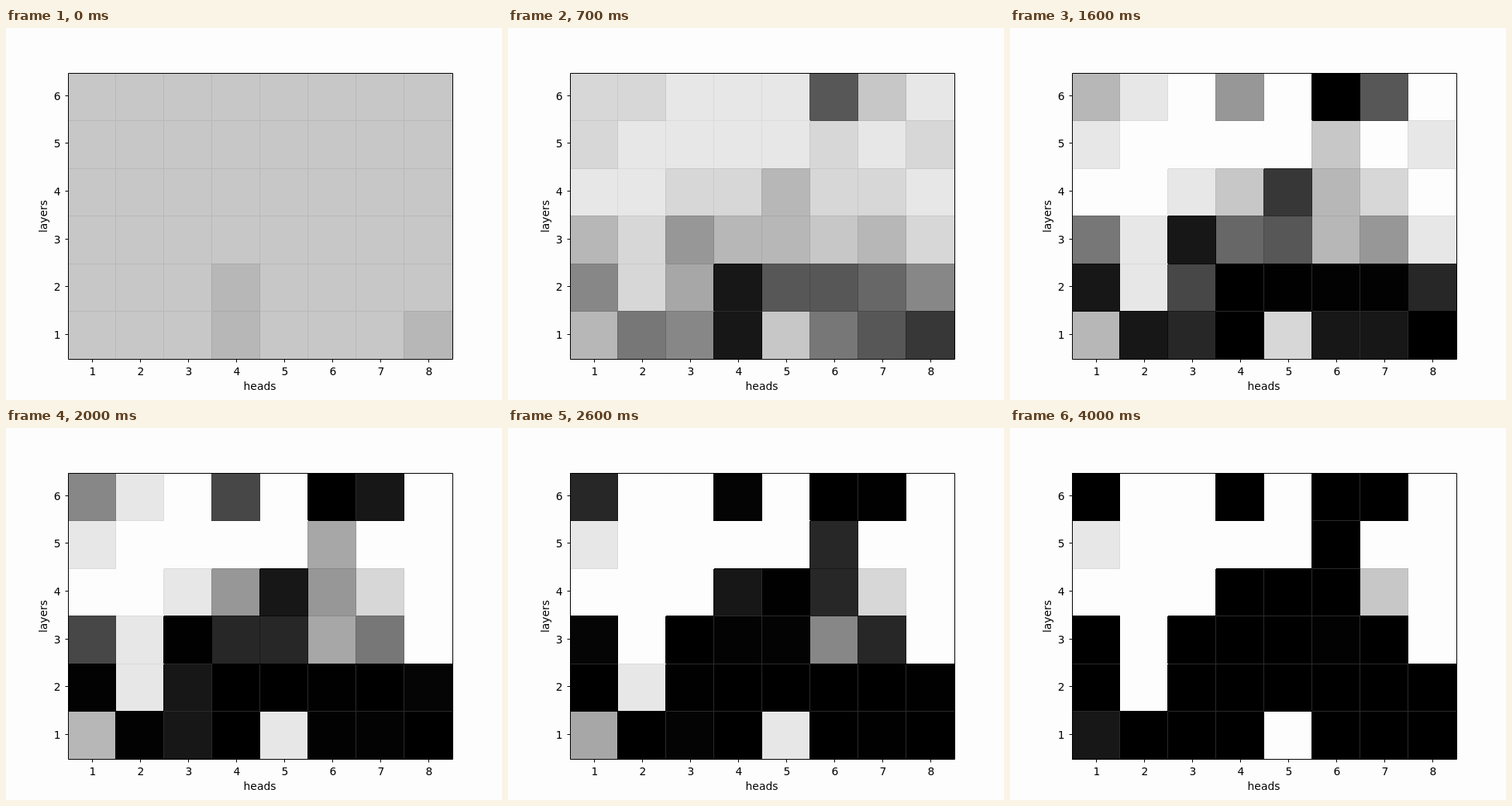
An HTML page with a canvas for the animation above (4100 ms loop, 640x480 px).

```html
<!DOCTYPE html>
<html lang="en">
<head>
<meta charset="utf-8">
<title>Heads and layers</title>
<style>
  html, body { margin: 0; width: 100%; height: 100%; overflow: hidden; background: #fdfdfd; }
  canvas, svg { position: absolute; left: 0; top: 0; width: 640px; height: 480px; }
  text { font: 13.89px "DejaVu Sans", sans-serif; fill: #000; }
  path { fill: none; stroke: #000; }
</style>
</head>
<body>
<canvas id="map" width="640" height="480"></canvas>
<svg id="axes" viewBox="0 0 640 480">
  <path d="M80.5 58.5H576.5V427.5H80.5Z"/>
  <text x="327.5" y="467" text-anchor="middle">heads</text>
  <text transform="translate(52.5 243) rotate(-90)" text-anchor="middle">layers</text>
</svg>
<script>
const STEP = 100, STEPS = 41, COLS = 8, ROWS = 6;
const xs = Array.from({ length: COLS + 1 }, (_, i) => 80 + 62 * i);
const ys = Array.from({ length: ROWS + 1 }, (_, i) => Math.round(58.4 + 61.6 * i));

// Logit (in tenths) of each head's brightness after 1, 2 and 3 seconds;
// missing entries continue in a straight line.
const up = [33], soon = [23, 33];
const heads = [
  [[18, 1, -37], [20, 25, 35], up, [18, -9, -52], up, [-22, -95], [8, -22, -65], up],
  [[17, 23, 25], up, up, up, soon, [17, 7, -37], soon, [20, 30]],
  [soon, up, [17, 24, 33], [17, 4, -46], [6, -25], [14, 4, -38], [17, 17, 16], up],
  [[6, -11, -45], [17, 23, 33], [-4, -43], [6, -15, -52], [6, -17, -50], [13, 7, -6], [9, -1, -28], [19, 30]],
  [[-7, -40], [18, 23, 27], [3, -22, -62], [-39, -85], [-17, -62], [-17, -52], [-14, -60], [-5, -29]],
  [[8, 9, 1], [-9, -40], [-5, -22], [-39, -105], [13, 22, 27], [-10, -39], [-14, -36], [-24, -75]]
];

function makeCurve(knots) {
  const p = [knots[0] < -23 ? 9.7 : 12.7, ...knots];
  while (p.length < 4) p.push(2 * p[p.length - 1] - p[p.length - 2]);
  const m1 = (p[2] - p[0]) / 2, m2 = (p[3] - p[1]) / 2;
  const m = [2 * (p[1] - p[0]) - m1, m1, m2, 2 * (p[3] - p[2]) - m2];
  return t => {
    if (t >= 3) {
      const u = t - 3;
      return p[3] + m[3] * (u + u * u);
    }
    const i = Math.floor(t), u = t - i, v = 1 - u;
    return (1 + 2 * u) * v * v * p[i] + u * v * v * m[i]
      + u * u * (3 - 2 * u) * p[i + 1] - u * u * v * m[i + 1];
  };
}

const curves = heads.map(row => row.map(makeCurve));
const gray = x => 255 / (1 + Math.exp(-x / 10));
const ctx = document.getElementById("map").getContext("2d");

function shade(g) {
  const k = Math.round((g - 7) / 16);
  return k >= 15 ? 253 : k <= 0 ? g * 0.4 : 7 + 16 * k;
}

function seam(a, b) {
  if (Math.max(a, b) < 30) return 42;
  const low = Math.min(a, b);
  return Math.max(0, low - Math.min(14, (255 - low) / 2));
}

function fill(g, x, y, w, h) {
  const v = Math.round(g);
  ctx.fillStyle = `rgb(${v},${v},${v})`;
  ctx.fillRect(x, y, w, h);
}

function draw(t) {
  const g = curves.map(row => row.map(curve => gray(curve(t))));
  const q = g.map(row => row.map(shade));
  const each = fn => q.forEach((row, r) => row.forEach((v, c) =>
    fn(v, r, c, xs[c], ys[r], xs[c + 1] - xs[c], ys[r + 1] - ys[r])));
  each((v, r, c, x, y, w, h) => fill(v, x, y, w, h));
  each((v, r, c, x, y, w, h) => {
    const settled = (a, b) => Math.min(a, b) > 252;
    if (c && !settled(g[r][c], g[r][c - 1])) fill(seam(v, q[r][c - 1]), x - 1, y, 1, h);
    if (r && !settled(g[r][c], g[r - 1][c])) fill(seam(v, q[r - 1][c]), x, y - 1, w, 1);
  });
}

const svg = document.getElementById("axes");
function add(tag, attrs, label = "") {
  const el = document.createElementNS("http://www.w3.org/2000/svg", tag);
  for (const key in attrs) el.setAttribute(key, attrs[key]);
  el.textContent = label;
  svg.append(el);
}
for (let i = 0; i < COLS; i++) {
  const x = 112 + 62 * i;
  add("path", { d: `M${x - 0.5} 428v3.5` });
  add("text", { x, y: 448, "text-anchor": "middle" }, i + 1);
}
for (let i = 0; i < ROWS; i++) {
  const y = Math.round(395.8 - 61.6 * i);
  add("path", { d: `M76.5 ${y - 0.5}H80` });
  add("text", { x: 70.5, y: y + 5, "text-anchor": "end" }, i + 1);
}

let shown = -1;
function tick() {
  const n = Math.floor(performance.now() / STEP) % STEPS;
  if (n !== shown) draw((shown = n) * STEP / 1000);
  requestAnimationFrame(tick);
}
tick();
</script>
</body>
</html>
```
